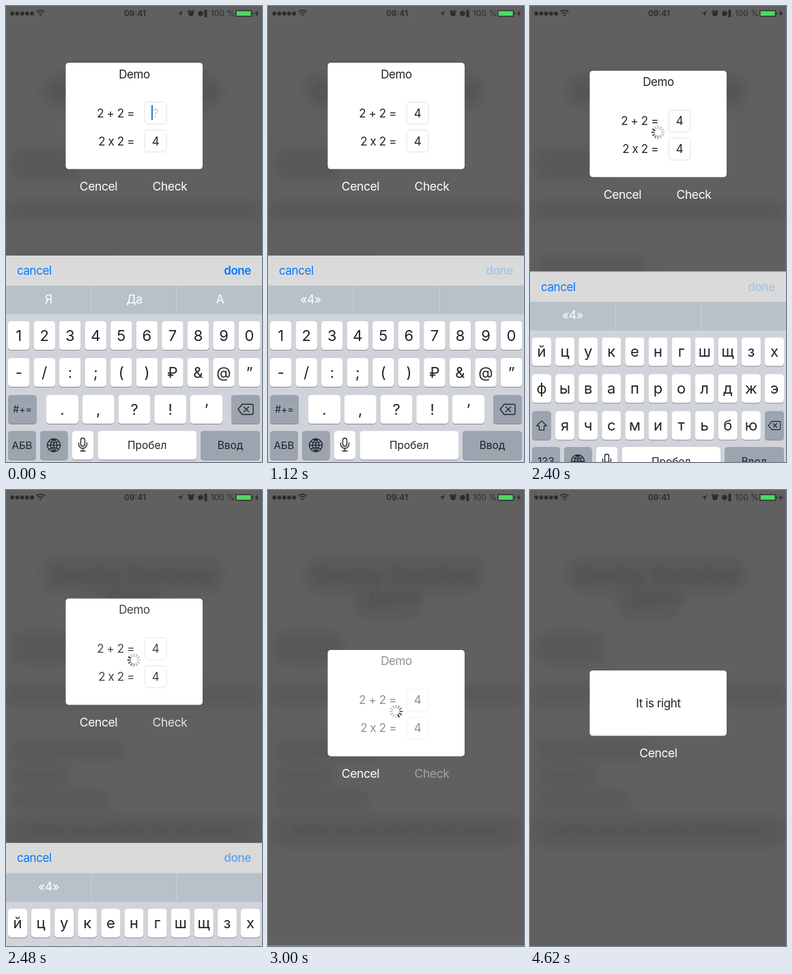
An HTML page for the animation above (4.9 s loop, 375x667 px).

```html
<!DOCTYPE html>
<html lang="en">
<head>
<meta charset="utf-8">
<title>Sum check</title>
<style>
  html, body { margin: 0; width: 100%; height: 100%; overflow: hidden; background: #606060; }
  svg { display: block; width: 100vw; height: 100vh; }
  text { font-family: Inter, Roboto, sans-serif; font-size: 17px; letter-spacing: -.4px; fill: #222; text-anchor: middle; }
  .white { fill: #fff; font-size: 17.5px; }
  .sum { text-anchor: end; }
  .field { fill: #fff; stroke: #e2e2e4; }
  .blue { fill: #007aff; }
  .key text { letter-spacing: 0; }
  .line { fill: none; stroke: #24262a; stroke-width: 1.4; stroke-linecap: round; stroke-linejoin: round; }
  .status { fill: #2c2c2c; }
  .status text { fill: #2c2c2c; font-size: 12px; letter-spacing: 0; }
</style>
</head>
<body>
<svg viewBox="0 0 375 667">
  <defs>
    <filter id="soft" x="-20%" y="-60%" width="140%" height="220%"><feGaussianBlur stdDeviation="8"/></filter>
    <filter id="haze" x="-5%" y="-30%" width="110%" height="160%"><feGaussianBlur stdDeviation="2.5"/></filter>
  </defs>
  <rect width="375" height="667" fill="#606060"/>
  <g fill="#595959" filter="url(#soft)">
    <rect x="52" y="97" width="266" height="54" rx="25"/>
    <rect x="124" y="136" width="100" height="52" rx="24"/>
    <rect x="6" y="206" width="104" height="50" rx="20"/>
    <rect x="0" y="285" width="375" height="30"/>
    <rect x="8" y="365" width="165" height="30" rx="14"/>
    <rect x="8" y="404" width="88" height="28" rx="14"/>
    <rect x="8" y="440" width="142" height="24" rx="12"/>
    <rect x="0" y="476" width="375" height="46" rx="18"/>
  </g>
  <g opacity=".13" filter="url(#haze)">
    <text x="187" y="135" style="font-size:29px">Overlay Container</text>
    <text x="187" y="168" style="font-size:29px">Demo</text>
    <text x="187" y="503">Set the view and enter the right number</text>
  </g>

  <g class="status">
    <g id="dots"></g>
    <g fill="none" stroke="#2c2c2c" stroke-width="1.7">
      <path d="M44.5 8.6a8.5 8.5 0 0 1 12 0M46.8 11a5.4 5.4 0 0 1 7.4 0"/>
      <path d="M336.7 6.5h23v8.8h-23z" stroke-width="1"/>
    </g>
    <path d="M48.6 12.9a2.8 2.8 0 0 1 3.8 0l-1.9 2zM251 11.2l8.4-4.2-4.2 8.4v-4.2z"/>
    <circle cx="271" cy="11" r="3.9"/>
    <path d="M266 8.5l3-2.6M276 8.5l-3-2.6" stroke="#2c2c2c" stroke-width="1.5"/>
    <circle cx="285" cy="11" r="3.8"/>
    <rect x="290.5" y="5.5" width="4" height="11" rx="1"/>
    <rect x="338" y="7.8" width="20.4" height="6.2" fill="#4cd964"/>
    <path d="M360.6 9.2h1.4v3.4h-1.4zM368.5 6l-4.3 5.5h2.8l-1 4.5 4.5-6h-3z"/>
    <text x="189" y="15" style="font-weight:600">09:41</text>
    <text x="317.5" y="15">100 %</text>
  </g>

  <g id="panel">
    <rect id="card" x="87.5" y="83" width="200.5" height="155.5" rx="4.5" fill="#fff"/>
    <g id="quiz">
      <text x="188" y="105.5">Demo</text>
      <text class="sum" x="188" y="162.5">2 + 2 =</text>
      <text class="sum" x="188" y="203.5">2 x 2 =</text>
      <rect class="field" x="203" y="140.5" width="32" height="32" rx="5"/>
      <rect class="field" x="203" y="181.5" width="32" height="32" rx="5"/>
      <text id="answer" x="219" y="162.5"></text>
      <text x="219" y="203.5">4</text>
      <rect id="caret" x="213" y="145" width="2" height="22" fill="#3571d3"/>
    </g>
    <text id="result" x="188" y="167">It is right</text>
    <g id="spinner"></g>
    <text id="cancel" class="white">Cencel</text>
    <text id="check" class="white" x="240" y="270">Check</text>
  </g>

  <g id="keyboard">
    <rect y="365" width="375" height="302" fill="#d0d3d9"/>
    <rect y="365" width="375" height="44" fill="#dadada"/>
    <rect y="409" width="375" height="42" fill="#b8c1ca"/>
    <path d="M125 409v42M250.5 409v42" stroke="#cbd2d8"/>
    <text class="blue" x="16" y="393" style="text-anchor:start">cancel</text>
    <text id="done" class="blue" x="359" y="393" style="text-anchor:end;font-weight:600">done</text>
    <g id="hints">
      <text class="white" x="62.5" y="434.5"></text>
      <text class="white" x="188" y="434.5"></text>
      <text class="white" x="313.5" y="434.5"></text>
    </g>
    <g id="numbers"></g>
    <g id="letters"></g>
    <g id="bottom"></g>
  </g>
</svg>
<script>
const LOOP = 4900;
const $ = id => document.getElementById(id);

function add(parent, tag, attrs, text) {
  const el = document.createElementNS('http://www.w3.org/2000/svg', tag);
  for (const k in attrs) el.setAttribute(k, attrs[k]);
  if (text) el.textContent = text;
  parent.appendChild(el);
  return el;
}

// Keys
function key(parent, x, y, w, label, size, dark) {
  const g = add(parent, 'g', { class: 'key' });
  add(g, 'rect', { x, y: y + 1, width: w, height: 42, rx: 4.5, fill: '#878a8f' });
  add(g, 'rect', { x, y, width: w, height: 42, rx: 4.5, fill: dark ? '#9ca4b0' : '#fff' });
  if (label) add(g, 'text', { x: x + w / 2, y: y + 21 + size * .36, style: `font-size:${size}px` }, label);
}
function row(parent, labels, x, y, w, pitch, size) {
  [...labels].forEach((c, i) => key(parent, x + i * pitch, y, w, c, size));
}
function icon(parent, d, x, y, scale = 1) {
  add(parent, 'path', { class: 'line', d, transform: `translate(${x} ${y}) scale(${scale})` });
}
const ERASE = 'M-11 0l6-7.5h14q2 0 2 2v11q0 2-2 2h-14zM-2.5-3.5l7 7m0-7l-7 7';
const SHIFT = 'M0-8l8 8h-4v7h-8v-7h-4z';
const GLOBE = 'M-9.5 0a9.5 9.5 0 1 0 19 0a9.5 9.5 0 1 0-19 0h19M0-9.5v19M0-9.5q-9.5 9.5 0 19q9.5-9.5 0-19M-7.5-5.5q7.5 4 15 0M-7.5 5.5q7.5-4 15 0';
const MIC = 'M-3-6a3 3 0 0 1 6 0v6a3 3 0 0 1-6 0zM-6-2v2a6 6 0 0 0 12 0v-2M0 6v4m-3.5 0h7';

const numbers = $('numbers'), letters = $('letters'), bottom = $('bottom');
row(numbers, '1234567890', 3, 461, 31.5, 37.53, 22);
row(numbers, '-/:;()₽&@”', 3, 515, 31.5, 37.53, 22);
row(numbers, '.,?!’', 59, 569, 47, 52.75, 22);
key(numbers, 3, 569, 42, '#+=', 14, true);
key(numbers, 330, 569, 42, '', 0, true);
icon(numbers, ERASE, 351, 590);
key(numbers, 3, 621.5, 41, 'АБВ', 15, true);

row(letters, 'йцукенгшщзх', 3, 461, 28, 34.1, 22);
row(letters, 'фывапролджэ', 3, 515, 28, 34.1, 22);
row(letters, 'ячсмитьбю', 37.1, 569, 28, 34.1, 22);
key(letters, 3, 569, 28, '', 0, true);
key(letters, 344, 569, 28, '', 0, true);
icon(letters, SHIFT, 17, 590.5, .9);
icon(letters, ERASE, 358, 590, .8);
key(letters, 3, 621.5, 41, '123', 15, true);

key(bottom, 50, 621.5, 40.5, '', 0, true);
key(bottom, 97, 621.5, 31, '', 0);
key(bottom, 134.5, 621.5, 144.5, 'Пробел', 15.5);
key(bottom, 285, 621.5, 87, 'Ввод', 15.5, true);
icon(bottom, GLOBE, 70, 642.5);
icon(bottom, MIC, 112.5, 641);

for (let i = 0; i < 5; i++) add($('dots'), 'circle', { cx: 9.3 + i * 7.2, cy: 11, r: 2.9 });

// Spinner: twelve spokes, one step per twelfth of a second
const spokes = Array.from({ length: 12 }, (_, i) => add($('spinner'), 'rect', {
  x: -1, y: -10, width: 2, height: 5.2, rx: 1, fill: '#30323a',
  transform: `translate(187.5 173) rotate(${i * 30})`
}));

// Motion helpers
const clamp = v => Math.max(0, Math.min(1, v));
const ramp = (t, a, b) => clamp((t - a) / (b - a));
const ease = p => p * p * (3 - 2 * p);
const mix = (a, b, p) => a + (b - a) * p;
const show = (el, o) => el.setAttribute('opacity', o);
function spring(ms) {
  const x = Math.max(0, ms) * .0153;
  return 1 - (1 + x) * Math.exp(-x);
}

const TYPED = 560, TAPPED = 1080, SWAP = 1660, BUSY = 2300, DROP = 2371, REPLY = 3960;
const hints = [...$('hints').children];

function render(t) {
  const typed = t >= TYPED;
  $('answer').textContent = typed ? '4' : '?';
  $('answer').style.fill = typed ? '#222' : '#bccbd6';
  $('caret').setAttribute('x', typed ? 225 : 213);
  show($('caret'), t < TAPPED ? 1 : 0);
  (typed ? ['«4»', '', ''] : ['Я', 'Да', 'А']).forEach((s, i) => hints[i].textContent = s);
  show($('done'), t < TAPPED ? 1 : mix(.22, 1, ramp(t, 2400, 2610)));
  show(numbers, t < SWAP ? 1 : 0);
  show(letters, t < SWAP ? 0 : 1);

  const drop = 302 * spring(t - DROP);
  $('keyboard').setAttribute('transform', `translate(0 ${drop})`);
  $('panel').setAttribute('transform', `translate(0 ${drop / 2})`);

  const busy = t >= BUSY && t < REPLY;
  show($('spinner'), busy ? ramp(t, BUSY, 2400) : 0);
  const head = 10 + Math.floor((t - 2400) / (1000 / 12));
  spokes.forEach((s, i) => {
    const age = ((head - i) % 12 + 12) % 12;
    show(s, Math.max(.28, 1 - age * .13));
  });

  const dim = ease(ramp(t, 2390, 2650));
  const p = ease(ramp(t, REPLY - 20, 4440));
  show($('quiz'), mix(1, .5, dim) * (1 - p));
  show($('check'), mix(1, .42, dim) * (1 - p));
  show($('result'), p);
  $('card').setAttribute('y', mix(83, 113, p));
  $('card').setAttribute('height', mix(155.5, 95.5, p));
  $('cancel').setAttribute('x', mix(135.5, 188, p));
  $('cancel').setAttribute('y', mix(270, 239.5, p));
}

const start = performance.now();
function frame() {
  render((performance.now() - start) % LOOP);
  requestAnimationFrame(frame);
}
frame();
</script>
</body>
</html>
```
